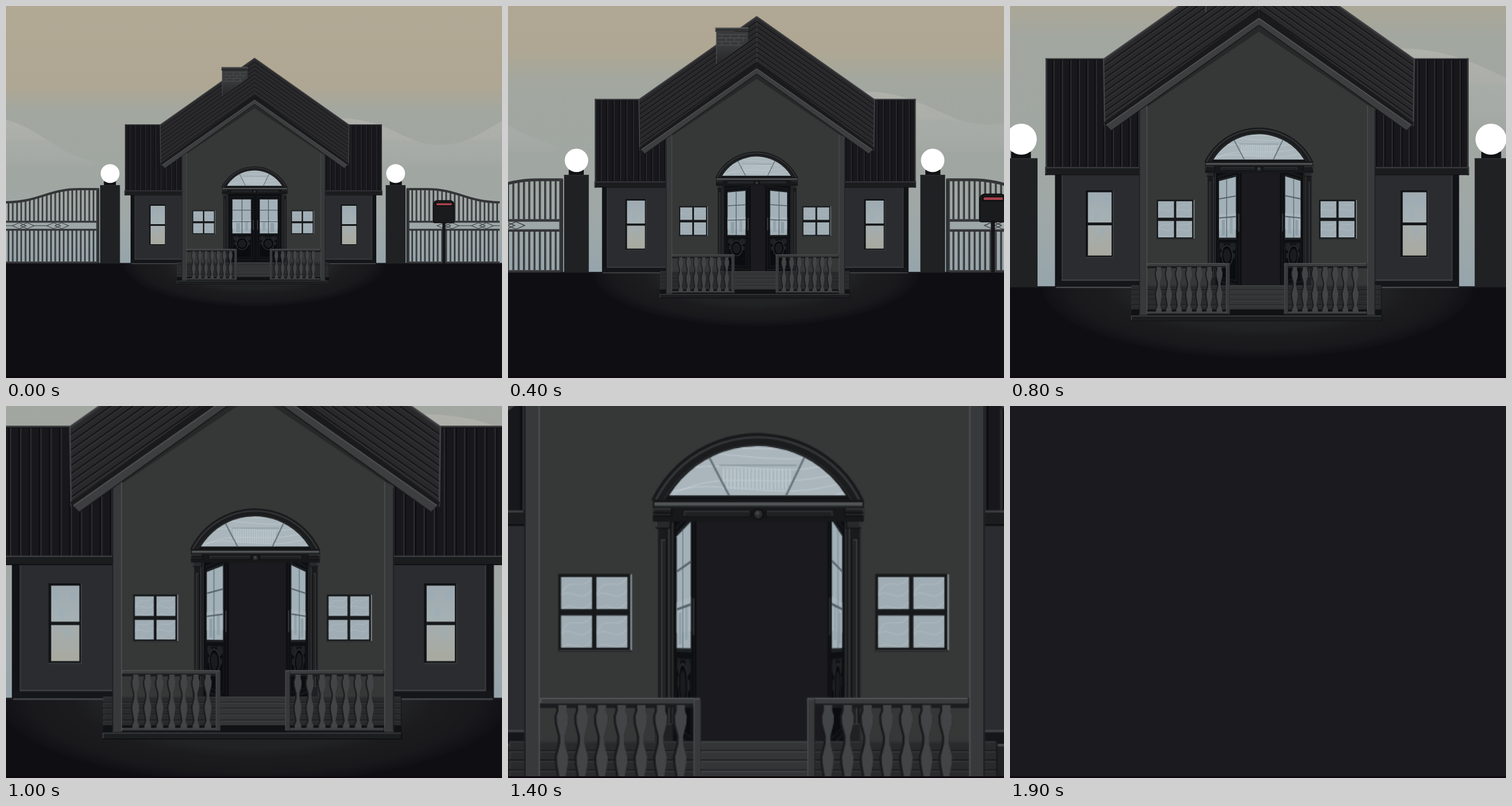
Write an HTML page with a canvas that moves like this. It is 864 px wide and 648 px high and loops after 2.1 s.

```html
<!DOCTYPE html>
<html lang="en">
<head>
<meta charset="utf-8">
<title>Through the front door</title>
<style>
html, body { margin: 0; width: 100%; height: 100%; overflow: hidden; background: #0f0e13; }
canvas { display: block; }
</style>
</head>
<body>
<canvas id="stage" width="864" height="648"></canvas>
<script>
const W = 864, H = 648, LOOP = 2100, STEP = 100, INSIDE = '#1b1a1e';
const FOCUS = { x: 432, y: 384.5 };
const SHARPEST = 1.8; // beyond this zoom the picture is enlarged softly
// Viewing distance (1 / zoom) at each step number.
const DISTANCE = [[0, 1], [4, .8016], [8, .608], [12, .4115], [14, .3115], [17, .181], [18, .14]];

const view = document.getElementById('stage').getContext('2d');
const buffer = document.createElement('canvas');
buffer.width = W;
buffer.height = H;
const ctx = buffer.getContext('2d');

function distanceAt(step) {
  const i = Math.max(1, DISTANCE.findIndex(key => key[0] >= step));
  const [a, from] = DISTANCE[i - 1], [b, to] = DISTANCE[i];
  return from + (to - from) * (step - a) / (b - a);
}
function zoomTo(context, zoom) {
  context.setTransform(zoom, 0, 0, zoom, FOCUS.x * (1 - zoom), FOCUS.y * (1 - zoom));
}

function rect(x, y, w, h, fill) {
  ctx.fillStyle = fill;
  ctx.fillRect(x, y, w, h);
}
function trace(points) {
  ctx.beginPath();
  points.forEach(([x, y]) => ctx.lineTo(x, y));
}
function poly(points, fill) {
  trace(points);
  ctx.closePath();
  ctx.fillStyle = fill;
  ctx.fill();
}
function line(points, color, width = 1) {
  trace(points);
  ctx.strokeStyle = color;
  ctx.lineWidth = width;
  ctx.stroke();
}
function oval(x, y, rx, ry, fill) {
  ctx.beginPath();
  ctx.ellipse(x, y, rx, ry, 0, 0, Math.PI * 2);
  ctx.fillStyle = fill;
  ctx.fill();
}
// Circle segment standing on the line y.
function segmentPath(x, y, half, height) {
  const r = (half * half + height * height) / (2 * height);
  const tilt = Math.asin((r - height) / r);
  ctx.beginPath();
  ctx.arc(x, y + r - height, r, Math.PI + tilt, -tilt);
  ctx.closePath();
}
function fade(y0, y1, ...stops) {
  const g = ctx.createLinearGradient(0, y0, 0, y1);
  stops.forEach(([at, color]) => g.addColorStop((at - y0) / (y1 - y0), color));
  return g;
}
// Bevelled block: light on the top left, dark on the bottom right.
function block(x, y, w, h, fill, light = '#505153', dark = '#0f1012', edge = .7) {
  rect(x, y, w, h, dark);
  rect(x, y, w - edge, h - edge, light);
  rect(x + edge, y + edge, w - 2 * edge, h - 2 * edge, fill);
}
function mirrored(axis, draw) {
  draw();
  ctx.save();
  ctx.translate(2 * axis, 0);
  ctx.scale(-1, 1);
  draw();
  ctx.restore();
}
function swirls(x, y, w, h, count, alpha) {
  ctx.save();
  ctx.beginPath();
  ctx.rect(x, y, w, h);
  ctx.clip();
  ctx.strokeStyle = `rgba(214,224,229,${alpha})`;
  ctx.lineWidth = .7;
  for (let i = 0; i < count; i++) {
    const at = y + h * (i * 1.5 / count);
    ctx.beginPath();
    ctx.moveTo(x, at + h * .2 * Math.sin(i * 2));
    ctx.bezierCurveTo(x + w * .3, at - h * .5, x + w * .6, at + h * .15, x + w, at - h * .35);
    ctx.stroke();
  }
  ctx.restore();
}

function sky() {
  rect(0, 0, W, 450, fade(0, 450, [0, '#b2a995'], [138, '#afa793'], [184, '#a2a7a0'],
    [300, '#a0a6a1'], [360, '#a0a8a6'], [450, '#96a5ac']));
  ctx.fillStyle = fade(196, 280, [196, '#b0b1ab'], [232, '#abaea9'], [236, '#a8aca7'], [264, '#a6aaa6'], [280, '#a1a7a2']);
  ctx.fill(new Path2D('M0 198C60 214 90 258 155 272L150 280H0Z'));
  ctx.fill(new Path2D('M570 196C665 192 690 241 755 242C805 242 835 216 864 200V280H570Z'));
}

function ground() {
  rect(0, 448, W, 200, '#0f0e13');
  ctx.save();
  ctx.beginPath();
  ctx.rect(0, 448, W, 200);
  ctx.clip();
  ctx.translate(432, 448);
  ctx.scale(1, .33);
  const glow = ctx.createRadialGradient(0, 0, 0, 0, 0, 228);
  [[0, '#27282a'], [.6, '#212224'], [.7, '#1c1c1f'], [.88, '#19191c'], [1, '#111015']].forEach(s => glow.addColorStop(...s));
  oval(0, 0, 228, 228, glow);
  ctx.restore();
  rect(0, 447.5, W, 1.2, '#202124');
  rect(218, 447.8, 426, 1.6, '#48494a');
}

function gate() {
  const topRail = 'M162 319H128C72 319 60 341 0 342';
  ctx.save();
  ctx.clip(new Path2D(topRail + 'V448H162Z'));
  for (let x = 3; x < 158; x += 7.4) {
    for (const [y, h] of [[318, 57], [391, 56]]) {
      rect(x, y, 2.8, h, '#37393b');
      rect(x + 1.9, y, .9, h, '#505355');
    }
  }
  ctx.restore();
  ctx.strokeStyle = '#343537';
  ctx.lineWidth = 4;
  ctx.stroke(new Path2D(topRail));
  for (const y of [374, 388, 445]) block(0, y, 162, 3.4, '#343537', '#4b4d4e', '#242527');
  for (const x of [30, 90]) {
    for (const dx of [-7, 7]) {
      line([[x + dx - 12, 382.7], [x + dx, 377.5], [x + dx + 12, 382.7], [x + dx, 388], [x + dx - 12, 382.7]], '#3c3e40', 1.1);
    }
  }
  line([[0, 382.7], [11, 382.7]], '#3c3e40');
  line([[49, 382.7], [71, 382.7]], '#3c3e40');
  block(157.5, 318, 5, 130, '#303133', '#55575a');
  rect(164, 312, 34.5, 136, '#1f2123');
  rect(164, 312, 34.5, 1, '#2c2e30');
  rect(170.5, 305, 21, 7, '#111214');
  oval(181.3, 291.8, 16.4, 16.4, '#fff');
}

function mailbox() {
  block(760, 376, 5.5, 72, '#151618', '#2c2d30');
  ctx.beginPath();
  ctx.roundRect(744.5, 339, 36, 38.5, [7, 7, 2, 2]);
  ctx.fillStyle = '#1a1b1d';
  ctx.fill();
  ctx.strokeStyle = '#0e0f11';
  ctx.lineWidth = 1.5;
  ctx.stroke();
  rect(748, 342, 30, 7, '#0d0e10');
  rect(750, 343.5, 26.5, 3.6, '#a9434d');
}

function wing() {
  rect(217, 328, 8, 120, '#121316');
  rect(224, 328, 84, 120, '#2b2c2f');
  rect(224, 329, 1, 113, '#3b3c3f');
  rect(218, 441, 90, 7, '#151619');
  rect(224, 440.5, 84, 1.2, '#434446');
  rect(207, 206.5, 100, 118, '#18171b');
  for (let x = 214; x < 307; x += 9) {
    rect(x, 207, 1.2, 116, '#0d0d10');
    rect(x + 1.2, 207, 1.3, 116, '#2d2d31');
  }
  block(207, 206, 100, 2, '#28282b');
  rect(207, 206, 1.5, 124, '#3c3d3f');
  block(206.5, 321.3, 100.5, 8.5, '#1b1c1e', '#3e3f41', '#0f1012', 1.2);
}

function wingWindow(x) {
  block(x, 346, 29.5, 71.5, '#15171a', '#0c0d0f', '#3c3f41', 1);
  const pane = fade(348, 415, [348, '#9fabb1'], [380, '#a6b1b4'], [383, '#a5adad'], [415, '#a9aaa0']);
  rect(x + 2.3, 348, 25, 32, pane);
  rect(x + 2.3, 383, 25, 32, pane);
  for (let i = 0; i < 4; i++) {
    oval(x + 6 + i * 5.5, 356 + i * 17 % 50, 3, 5, 'rgba(150,172,188,.3)');
  }
}

function roof() {
  mirrored(433, () => {
    poly([[433, 91], [268.5, 207], [269.5, 277], [433, 164]], '#29292b');
    const rows = 10;
    for (let i = 0; i <= rows; i++) {
      const y = 91 + 71 * i / rows, end = 207 + 70 * i / rows;
      line([[433, y], [269, end]], '#151517', 1.3);
      line([[433, y + 1.2], [269, end + 1.2]], '#363638', .8);
    }
    line([[433, 91], [268.5, 207], [269.5, 277]], '#434446', 1.4);
    poly([[433, 155], [433, 165], [271, 280], [269, 274]], '#1a1a1d');
  });
}

function chimney() {
  const shade = fade(112, 158, [112, '#38393a'], [133, '#38393a'], [158, '#252527']);
  poly([[376.5, 112], [421, 112], [421, 126], [376.5, 158]], shade);
  ctx.globalAlpha = .75;
  for (let row = 0; row < 4; row++) {
    const y = 116 + row * 5;
    line([[378, y], [row < 2 ? 419 : 411, y]], '#606163', .7);
    for (let x = 384 + row % 2 * 6; row < 3 && x < 418; x += 12) line([[x, y], [x, y + 5]], '#606163', .7);
  }
  ctx.globalAlpha = 1;
  line([[376.8, 112], [376.8, 157]], '#555658', .8);
  block(375, 106.5, 47.5, 5.5, '#303133', '#6a6b6c', '#18191a', 1);
}

function facade() {
  poly([[308, 449], [308, 253], [433, 165], [555, 251], [555, 449]], '#363837');
  mirrored(433, () => {
    poly([[433, 170], [433, 178], [314, 258], [314, 252]], '#272928');
    poly([[433, 163.5], [433, 171], [277, 282.5], [271.5, 277]], '#3d3e40');
    line([[433, 163.8], [271.5, 277]], '#525355', 1);
    line([[433, 171], [277, 282.5]], '#19191b', 1);
  });
}

function posts() {
  mirrored(431.2, () => {
    poly([[306.3, 262], [314.7, 256], [314.7, 478], [306.3, 478]], '#37393a');
    line([[306.6, 261], [306.6, 477]], '#1d1e20', .8);
    line([[314.4, 256], [314.4, 477]], '#525454', .7);
  });
}

function squareWindow(x) {
  rect(x - .3, 355.8, 40, 42.2, '#17191b');
  rect(x + 38.8, 356, .9, 41.5, '#8b979c');
  rect(x, 397, 39.5, .8, '#33373a');
  for (const dx of [1.2, 20.4]) for (const y of [357.5, 378.4]) {
    rect(x + dx, y, 16.8, 17.4, '#a0adb4');
    swirls(x + dx, y, 16.8, 17.4, 4, .18);
  }
}

function fanlight() {
  const cx = 432.8, base = 315.8;
  const rings = [[57.7, 36.4, '#18191b'], [56, 34.8, '#343638'], [54.6, 33.5, '#1b1c1e'], [51.5, 30.4, '#252729'], [50.4, 29.3, '#121315']];
  for (const [half, height, fill] of rings) {
    segmentPath(cx, base, half, height);
    ctx.fillStyle = fill;
    ctx.fill();
  }
  ctx.save();
  segmentPath(cx, 313.3, 48, 26.8);
  ctx.clip();
  rect(380, 284, 108, 32, '#aab6bc');
  swirls(384, 286, 97, 27, 7, .32);
  rect(412, 296.5, 42, .8, '#909da4');
  for (let x = 414; x < 451; x += 2) rect(x, 298.5, .8, 11.5, '#bdcacf');
  line([[405.5, 290.5], [417.5, 313.5]], '#65727a', 1.1);
  line([[459.5, 290], [448.2, 313.5]], '#65727a', 1.1);
  ctx.restore();
}

// A door leaf hinged at x; span is its signed full width, open runs from 0 to 1.
// The free edge swings towards the viewer, so it grows and its inner parts crowd the hinge.
function leaf(hinge, span, open) {
  const at = (u, y) => [
    hinge + span * (1 - open) * u / (1 + open * (1 - u)),
    395 + (y - 395) * (1 + .26 * u * open)
  ];
  const panel = (u0, u1, y0, y1, fill) => poly([at(u0, y0), at(u1, y0), at(u1, y1), at(u0, y1)], fill);
  const ring = (u, y, ru, ry, fill) => poly(Array.from({ length: 24 }, (_, i) => {
    const a = i * Math.PI / 12;
    return at(u + ru * Math.cos(a), y + ry * Math.sin(a));
  }), fill);
  panel(0, 1, 322, 446, '#0d0e11');
  panel(.05, .95, 331, 443, '#17181b');
  panel(.08, .92, 333, 441, '#0e0f12');
  panel(.12, .86, 335, 398, '#1d2023');
  panel(.14, .83, 337, 396, '#a2b0b7');
  panel(.14, .83, 372, 388, '#a9b6bd');
  panel(.28, .42, 378, 394, '#8f9fa8');
  panel(.62, .72, 375, 392, '#93a3ac');
  for (const y of [355, 375]) panel(.14, .83, y, y + 1.2, '#56626a');
  panel(.48, .51, 337, 396, '#56626a');
  panel(.14, .86, 401, 438, '#17181b');
  panel(.17, .83, 402.5, 437, '#0b0c0f');
  ring(.28, 405, .11, 4, '#1f2124');
  ring(.72, 405, .11, 4, '#1f2124');
  panel(.2, .8, 411, 416, '#202225');
  ring(.5, 414, .24, 11, '#26282b');
  ring(.5, 414, .2, 9.5, '#090a0d');
  ring(.5, 414, .15, 7, '#1a1b1e');
  panel(.9, .94, 373, 390, '#36383b');
}

function doorway(step) {
  ctx.save();
  ctx.beginPath();
  ctx.rect(388, 326, 91.5, 122);
  ctx.clip();
  rect(388, 326, 92, 122, INSIDE);
  leaf(388, 46.5, step * .0536);
  leaf(479.5, -45, step * .0577);
  ctx.restore();

  mirrored(433.7, () => {
    block(378.7, 326, 9.5, 121, '#191a1c', '#252628', '#0d0e10');
    block(380.4, 337, 3.2, 110, '#222325', '#3b3d3e');
    rect(384.4, 331, .7, 116, '#3c3e40');
    rect(386.3, 328, .8, 119, '#2b2d2f');
  });
  mirrored(433.2, () => {
    block(377.3, 437, 10, 10, '#202123', '#333536');
    block(377.5, 325.2, 8.2, 6, '#28292b', '#3f4042');
  });
  rect(376, 315.5, 114.5, 12, '#17181a');
  rect(376.8, 317, 113, 1.9, '#525556');
  rect(376.8, 319.4, 113, .5, '#26282a');
  mirrored(433.2, () => {
    block(376, 320.2, 10.5, 4.6, '#1f2022', '#343638');
    rect(376, 322.3, 10.5, .6, '#101113');
    block(392.8, 321.5, 36.5, 3.6, '#1f2022', '#343638');
  });
  oval(433.2, 323.4, 3.2, 3.1, '#101113');
  oval(433.2, 323.4, 2.3, 2.3, '#2b2c2e');
  oval(432.8, 322.8, 1.1, 1.1, '#424345');
}

function steps() {
  rect(298, 447, 265, 26, '#1c1d1f');
  for (let y = 446.6; y < 470; y += 5.3) {
    block(298, y, 265, 5.3, '#292a2c', '#353738', '#17181a', .8);
    block(402, y, 59, 5.3, '#333536', '#424445', '#1d1e20', .8);
  }
  rect(298, 472, 265, 7, '#111214');
  block(297.5, 478.5, 266, 6, '#1c1d1f', '#414345', '#0c0d0f', .9);
}

function baluster(x) {
  const profile = [[427, 2.3], [430, 2.2], [433, 3.2], [437, 3], [444, 1.2], [448, 1.3], [455, 3.1], [459, 2.9], [468, 1.3], [472, 2.9], [475, 2.9]];
  const outline = grow => [
    ...profile.map(([y, w]) => [x - w - grow, y]),
    ...profile.slice().reverse().map(([y, w]) => [x + w, y])
  ];
  poly(outline(1.2), '#1a1b1d');
  poly(outline(0), '#434446');
}

function railing(x, width, firstBaluster, endPost) {
  rect(x, 426, width, 2.5, '#1b1c1e');
  rect(x, 474, width, 4, '#17181a');
  for (let i = 0; i < 7; i++) baluster(firstBaluster + i * 10.7);
  block(x, 423, width, 3.7, '#3a3c3d', '#565859', '#1c1d1f');
  block(x, 474.5, width, 2.5, '#39393b', '#4d4e50', '#1c1d1f');
  block(endPost, 423.5, 4.3, 53.5, '#38393b', '#4c4e4f', '#222325', .6);
}

function scene(step) {
  sky();
  ground();
  mirrored(430, gate);
  mailbox();
  mirrored(431, wing);
  [249.6, 583].forEach(wingWindow);
  roof();
  chimney();
  facade();
  [325, 497].forEach(squareWindow);
  fanlight();
  doorway(step);
  steps();
  posts();
  railing(314.8, 87.5, 327, 398);
  railing(459.7, 87.9, 471.1, 459.7);
}

function render() {
  const step = Math.floor(performance.now() % LOOP / STEP);
  view.setTransform(1, 0, 0, 1, 0, 0);
  view.fillStyle = INSIDE;
  view.fillRect(0, 0, W, H);
  if (step < 19) {
    const zoom = 1 / distanceAt(step), drawn = Math.min(zoom, SHARPEST);
    zoomTo(ctx, drawn);
    scene(step);
    zoomTo(view, zoom / drawn);
    view.drawImage(buffer, 0, 0);
    view.setTransform(1, 0, 0, 1, 0, 0);
  }
  view.fillStyle = '#0d080d';
  view.fillRect(0, 645, W, 3);
  requestAnimationFrame(render);
}
render();
</script>
</body>
</html>
```
